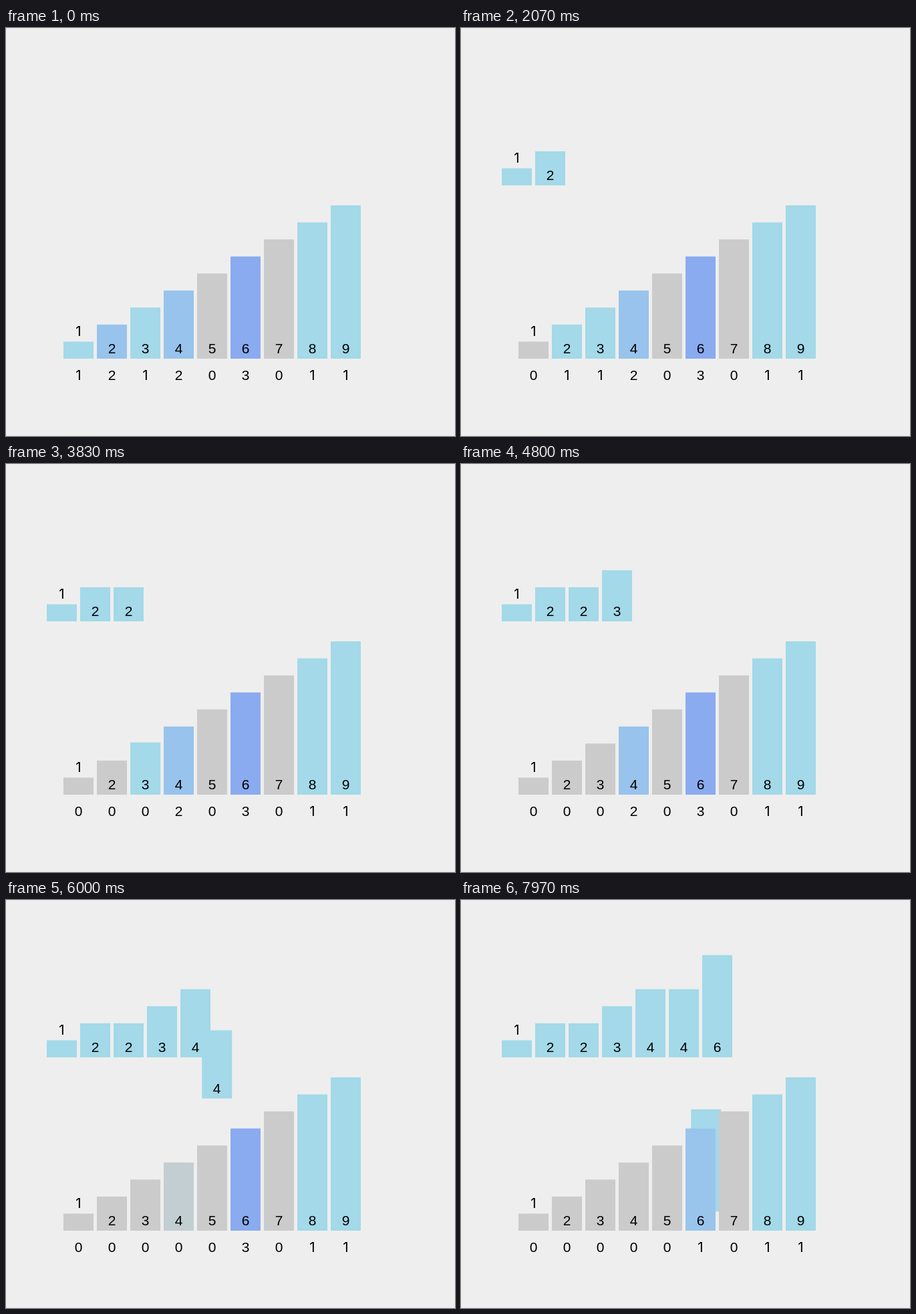
An HTML page that plays this animation: 672x612 px, repeating every 8000 ms.

```html
<!DOCTYPE html>
<html lang="en">
<head>
<meta charset="utf-8">
<title>Counting sort</title>
<style>
  html, body { margin: 0; width: 100%; height: 100%; overflow: hidden; background: #eee; }
  svg { display: block; width: 672px; height: 612px; }
  text { font: 21px "Liberation Sans", Arial, sans-serif; text-anchor: middle; fill: #000; }
  text.one { font: 20.5px Inter, Roboto, sans-serif; }
</style>
</head>
<body>
<svg viewBox="0 0 672 612"><g id="sorted"></g><g id="buckets"></g></svg>
<script>
const LOOP = 8000;
const FIRST = 731, PERIOD = 1023.5, MOVE = 250;
const WIDTH = 45, PITCH = 50, UNIT = 230 / 9;
const BUCKET = { x: 86, y: 496 }, SLOT = { x: 61, y: 236 };
const COUNTS = [1, 2, 1, 2, 0, 3, 0, 1, 1];
const MOVES = [1, 2, 2, 3, 4, 4, 6, 6];
const COLORS = [[203, 203, 203], [163, 217, 232], [152, 195, 236], [139, 171, 240]];

const rgb = c => `rgb(${c.map(Math.round).join()})`;
const mix = (a, b, p) => a + (b - a) * p;
const cubicInOut = u => u < 0.5 ? 4 * u ** 3 : 1 - 4 * (1 - u) ** 3;

function add(parent, tag, attrs) {
  const el = document.createElementNS("http://www.w3.org/2000/svg", tag);
  for (const key in attrs) el.setAttribute(key, attrs[key]);
  return parent.appendChild(el);
}

function setText(el, value) {
  el.textContent = value;
  el.setAttribute("class", value === 1 ? "one" : "");
}

// A bar stands on y = 0 of its own group.
function addBar(parent, value) {
  const group = add(parent, "g", {});
  const height = value * UNIT;
  const rect = add(group, "rect", { y: -height, width: WIDTH, height, fill: rgb(COLORS[1]) });
  setText(add(group, "text", { x: WIDTH / 2, y: value === 1 ? -34 : -8 }), value);
  return { group, rect };
}

function place(bar, x, y) {
  bar.group.setAttribute("transform", `translate(${x} ${y})`);
}

const buckets = COUNTS.map((_, i) => {
  const bar = addBar(document.getElementById("buckets"), i + 1);
  place(bar, BUCKET.x + i * PITCH, BUCKET.y);
  bar.count = add(bar.group, "text", { x: WIDTH / 2, y: 32 });
  return bar;
});
const items = MOVES.map(value => addBar(document.getElementById("sorted"), value));

function draw(t) {
  const counts = COUNTS.slice();
  const fills = counts.map(n => COLORS[n]);

  items.forEach((item, k) => {
    const i = MOVES[k] - 1;
    const u = (t - FIRST - k * PERIOD) / MOVE;
    item.group.style.display = u < 0 ? "none" : "";
    if (u < 0) return;
    const p = cubicInOut(Math.min(u, 1));
    place(item,
      mix(BUCKET.x + i * PITCH, SLOT.x + k * PITCH, p),
      mix(BUCKET.y, SLOT.y, p));
    const from = COLORS[counts[i]], to = COLORS[--counts[i]];
    fills[i] = from.map((c, n) => mix(c, to[n], p));
  });

  buckets.forEach((bar, i) => {
    bar.rect.setAttribute("fill", rgb(fills[i]));
    setText(bar.count, counts[i]);
  });
}

const start = performance.now();
function tick() {
  draw((performance.now() - start) % LOOP);
  requestAnimationFrame(tick);
}
tick();
</script>
</body>
</html>
```
